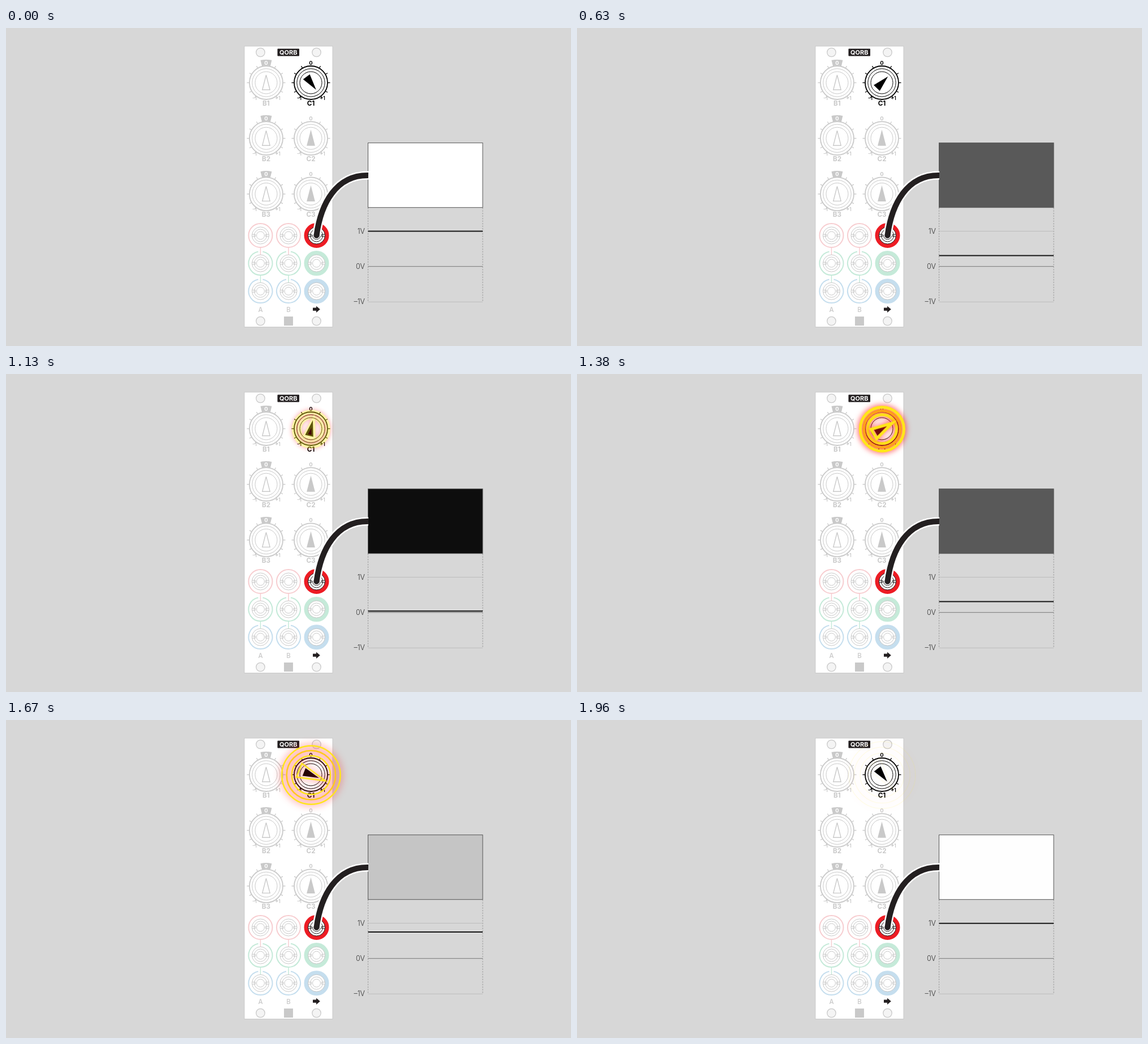
Write an HTML page that moves like this. It is 998 px wide and 561 px high and loops after 2040 ms.

```html
<!DOCTYPE html>
<html lang="en">
<head>
<meta charset="utf-8">
<title>Knob and voltage</title>
<style>
  html, body { margin: 0; width: 100%; height: 100%; overflow: hidden; background: #d7d7d7; }
  svg { display: block; width: 998px; height: 561px; }
  text { font-family: Inter, "Open Sans", sans-serif; text-anchor: middle; }
  .glow > * { fill: none; stroke: #ffe51a; filter: drop-shadow(0 0 4px #ff2020); }
</style>
</head>
<body>
<svg id="stage" viewBox="0 0 998 561"></svg>
<script>
const GREY = '#c9c9c9', INK = '#231f20';
const KNOB_X = 538.5, KNOB_Y = 96.5, TURN = 143;
const RINGS = [29.5, 24.7, 19.5];
const POINTER = 'M0-15.5L7.4 13H-7.4Z';

const circle = (x, y, r, stroke, width = 1, fill = 'none') =>
  `<circle cx="${x}" cy="${y}" r="${r}" fill="${fill}" stroke="${stroke}" stroke-width="${width}"/>`;
const path = (d, stroke, width = 1, extra = '') =>
  `<path d="${d}" fill="none" stroke="${stroke}" stroke-width="${width}" ${extra}/>`;
const label = (s, x, y, size, fill, weight = 700, extra = '') =>
  `<text x="${x}" y="${y}" font-size="${size}" fill="${fill}" font-weight="${weight}" ${extra}>${s}</text>`;

function knob(col, row) {
  const isB = col === 'B', live = !isB && row === 1;
  const ink = live ? '#000' : GREY;
  let s = RINGS.map((r, i) => circle(0, 0, r, ink, i ? 1 : 1.8)).join('');
  for (const a of [30, 60, 90, 120, TURN])
    for (const side of [-1, 1])
      s += path('M0-30V-34', ink, 1.3, `transform="rotate(${a * side})"`);
  if (isB) s += `<path d="M-10-39.7Q0-42 10-39.7L7.4-29.3Q0-31 -7.4-29.3Z" fill="${GREY}"/>`;
  s += label('0', 0, -32, 9.5, isB ? '#fff' : ink);
  s += label('-1', -20.5, 30, 9, ink, 600) + label('+1', 20.5, 30, 9, ink, 600);
  s += label(col + row, 0, 40.3, 11.7, ink);
  s += isB
    ? path('M0-13.5L6.7 12.5H-6.7Z', ink, 1.4)
    : `<path ${live ? 'id="pointer"' : ''} d="${POINTER}" fill="${ink}"/>`;
  const x = isB ? 459.5 : KNOB_X, y = KNOB_Y + (row - 1) * 98.2;
  return `<g transform="translate(${x} ${y})">${s}</g>`;
}

function jack(col, row) {
  const x = [449.5, 499, 548.5][col], y = 366 + row * 49.1;
  const out = col === 2, ink = out && !row ? '#222' : GREY;
  const soft = ['#f7cdd0', '#c5ead9', '#c5deee'];
  let s = '';
  if (out) s += circle(0, 0, 18.4, row ? soft[row] : '#ed1c24', 7.2, '#fff');
  else {
    s += row ? path('M4-20.7A21 21 0 1 1-4-20.7', soft[row], 2) : circle(0, 0, 21, soft[0], 2);
    if (row) s += path('M0-28V-15', soft[row - 1], 1.5);
  }
  s += circle(0, 0, 15, ink) + circle(0, 0, 11, ink) + circle(0, 0, 7, ink);
  s += path('M-15-1.8H-9V1.8H-15M15-1.8H9V1.8H15', ink);
  return `<g transform="translate(${x} ${y})">${s}</g>`;
}

const cable = 'M548.5 366C556 310 583 259 640 260';
const [cols, rows] = [[0, 1, 2], [0, 1, 2]];
const screws = [449.5, 548.5].flatMap(x => [43, 517].map(y => circle(x, y, 7.7, GREY, 1.3, '#f4f4f4')));

stage.innerHTML = `
  <rect x="421" y="32" width="156" height="495.5" fill="#fff" stroke="${GREY}"/>
  ${screws.join('')}
  <rect x="479.5" y="36.5" width="38.5" height="13" rx="1" fill="${INK}"/>
  ${label('QORB', 498.8, 46.9, 11, '#fff')}
  ${[1, 2, 3].map(r => knob('B', r) + knob('C', r)).join('')}
  ${cols.map(c => rows.map(r => jack(c, r)).join('')).join('')}
  ${label('A', 449.5, 500.5, 11.5, GREY, 500)}${label('B', 499, 500.5, 11.5, GREY, 500)}
  <path d="M542 493.6h6v-3.2l6.8 5.8-6.8 5.8v-3.2h-6z" fill="${INK}"/>
  <rect x="491" y="509" width="16" height="16" fill="${GREY}"/>
  ${path('M639.5 317V483M842 317V483', '#999', 1, 'stroke-dasharray="2.5 2"')}
  ${path('M639.5 358.5H842M639.5 483.2H842', '#bdbdbd')}
  ${path('M639.5 420.7H842', '#777')}
  ${['1V', '0V', '–1V'].map((s, i) => label(s, 634, 362.8 + i * 62.3, 12.5, '#333', 300, 'style="text-anchor:end"')).join('')}
  <rect id="screen" x="639.5" y="202.7" width="202.5" height="114" stroke="#555"/>
  ${path('M639.5 0H842', '#161616', 2, 'id="signal"')}
  ${path(cable, '#fff', 15)}
  ${path(cable, INK, 10)}${circle(548.5, 366, 5, 'none', 0, INK)}
  <g id="glow" class="glow">
    ${[1, 2, 0].map(i => circle(0, 0, RINGS[i], '')).join('')}
    <path id="glowPointer" d="${POINTER}"/>
  </g>`;

const $ = id => document.getElementById(id);
const set = (id, attrs) => { for (const a in attrs) $(id).setAttribute(a, attrs[a]); };

// cubic-bezier(1/6, 0, 2/3, 1)
function ease(x) {
  let lo = 0, hi = 1, s;
  for (let i = 0; i < 25; i++) {
    s = (lo + hi) / 2;
    const at = s * (1 - s) * (1 - s) / 2 + 2 * s * s * (1 - s) + s ** 3;
    if (at < x) lo = s; else hi = s;
  }
  return s * s * (3 - 2 * s);
}

function draw(ms) {
  let k = Math.floor((Math.floor(ms / 10) * 10 + 4) * 24 / 1000);
  if ([14, 28, 48].includes(k)) k--; // held steps
  const volts = (1 + Math.cos(Math.PI * k / 24)) / 2;
  const angle = TURN * (k <= 24 ? volts : ease((k - 24) / 24));
  const shade = Math.round(255 * volts ** 0.9);

  set('screen', { fill: `rgb(${shade},${shade},${shade})` });
  set('signal', { transform: `translate(0 ${420.7 - 62.2 * volts})` });
  set('pointer', { transform: `rotate(${angle})` });

  // rings grow and thin out while the knob turns back up
  const scale = 1 + volts;
  set('glow', {
    transform: `translate(${KNOB_X + 0.4} ${KNOB_Y + 0.7}) scale(${scale})`,
    'stroke-width': (7 - 6 * volts) / scale,
    opacity: Math.max(0, Math.min(1, (k - 24) / 8, (48 - k) / 8))
  });
  for (const c of $('glow').children) c.removeAttribute('stroke-width');
  set('glowPointer', { transform: `rotate(${angle})` });
}

const start = performance.now();
(function tick() {
  draw((performance.now() - start) % 2040);
  requestAnimationFrame(tick);
})();
</script>
</body>
</html>
```
